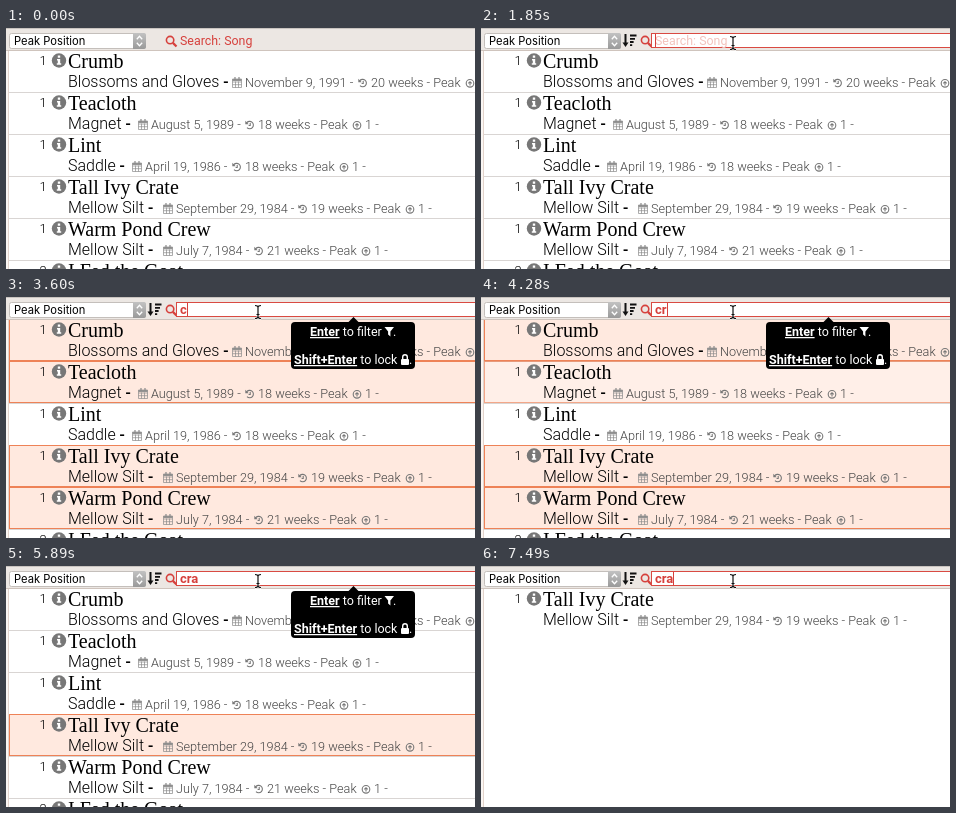
Recreate the animation shown at these times as an HTML page. Size 469x241 px, loop 8 s.

```html
<!DOCTYPE html>
<html lang="en">
<head>
<meta charset="utf-8">
<title>Filter list</title>
<style>
html, body { margin: 0; width: 100%; height: 100%; overflow: hidden; background: #fff; }
svg { display: block; width: 469px; height: 241px; font-family: Roboto, sans-serif; }
svg text { white-space: pre; }

.title { font: 20px "Liberation Serif", serif; }
.album { font-size: 16px; font-weight: 300; }
.dash { font-weight: 500; }
.meta { font-size: 12.7px; font-weight: 300; fill: #444; }
.num { font-size: 13px; font-weight: 300; }
.line { fill: #d9d5d3; }
.hit { fill: #ffe9df; stroke: #ee8257; opacity: 0; }
.label { font-size: 12.4px; fill: #d6403c; }
.tip { font-size: 12.5px; fill: #fff; }
.key { font-weight: 700; text-decoration: underline; }
.typed { font-size: 13px; font-weight: 700; }

.anim, .hit { animation: 8s linear infinite; }
.step { animation: 8s step-end infinite; }

/* focus at 1500 ms */
#idle { animation-name: idle; }
#focus { animation-name: focus; }
@keyframes idle { 0% { opacity: 1 } 18.75%, 100% { opacity: 0 } }
@keyframes focus { 0% { opacity: 0 } 18.75%, 100% { opacity: 1 } }

#hint { animation-name: hint; }
@keyframes hint { 0% { opacity: 1 } 38.75%, 100% { opacity: 0 } }

#k0 { animation-name: k0; }
#k1 { animation-name: k1; }
#k2 { animation-name: k2; }
@keyframes k0 { 0% { fill: transparent } 38.75%, 100% { fill: #d6403c } }
@keyframes k1 { 0% { fill: transparent } 49.125%, 100% { fill: #d6403c } }
@keyframes k2 { 0% { fill: transparent } 60.875%, 100% { fill: #d6403c } }

#caret { animation-name: caretMove, caretBlink; }
@keyframes caretMove {
  0% { transform: translateX(174px) }
  38.75% { transform: translateX(181px) }
  49.125% { transform: translateX(186px) }
  60.875%, 100% { transform: translateX(192px) }
}
@keyframes caretBlink {
  0% { opacity: 0 } 18.75% { opacity: 1 } 29.875% { opacity: 0 } 35.75% { opacity: 1 }
  73.625% { opacity: 0 } 79.5% { opacity: 1 } 85.5% { opacity: 0 } 88.75%, 100% { opacity: 1 }
}

#tip { animation-name: tip; }
@keyframes tip { 0%, 43.9% { opacity: 0 } 45%, 87.5% { opacity: 1 } 88.75%, 100% { opacity: 0 } }

.hit.c { animation-name: hitC; }
.hit.cr { animation-name: hitCr; }
.hit.cra { animation-name: hitCra; }
@keyframes hitC { 0%, 43.9% { opacity: 0 } 45%, 53.2% { opacity: 1 } 54.25%, 100% { opacity: 0 } }
@keyframes hitCr { 0%, 43.9% { opacity: 0 } 45%, 65% { opacity: 1 } 66.125%, 100% { opacity: 0 } }
@keyframes hitCra { 0%, 43.9% { opacity: 0 } 45%, 87.5% { opacity: 1 } 88.75%, 100% { opacity: 0 } }

.drop { animation-name: drop; }
.rise { animation-name: rise; }
@keyframes drop { 0% { opacity: 1 } 87.75%, 100% { opacity: 0 } }
@keyframes rise { 0% { transform: none } 87.75%, 100% { transform: translateY(-126px) } }

#arrow { animation-name: arrowMove, arrowShow; }
@keyframes arrowMove {
  0%, 3% { transform: translate(300px, -18px); animation-timing-function: ease-out }
  12.4%, 13.1% { transform: translate(283px, 19px); animation-timing-function: ease-in-out }
  18%, 100% { transform: translate(256px, 15px) }
}
@keyframes arrowShow { 0%, 17% { opacity: 1 } 17.01%, 100% { opacity: 0 } }
#beam { animation-name: beamMove, beamShow; }
@keyframes beamMove {
  0%, 17% { transform: translate(259px, 15px) }
  23.125%, 26.8% { transform: translate(252px, 15px) }
  28.4% { transform: translate(255px, 14px) }
  29.875%, 100% { transform: translate(252px, 15px) }
}
@keyframes beamShow { 0%, 17% { opacity: 0 } 17.01%, 100% { opacity: 1 } }

#load { animation-name: load; }
@keyframes load {
  0%, 90.6% { transform: scaleX(0) }
  93% { transform: scaleX(1) }
  93.6%, 100% { transform: scaleX(0) }
}
</style>
</head>
<body>
<svg viewBox="0 0 469 241" xmlns="http://www.w3.org/2000/svg">
  <defs>
    <g id="cal" fill="none" stroke="#8a8a8a" stroke-width=".7">
      <path d="M.5 2h9v8.5h-9zM.5 5h9M.5 7.7h9M3.5 4.5v6M6.5 4.5v6"/>
      <path d="M.5 3h9" stroke-width="1.8"/>
      <path d="M3 0v3M7 0v3" stroke-width="1.2"/>
    </g>
    <g id="hist" fill="none" stroke="#777" stroke-width="1.1">
      <path d="M1.6 4A3.7 3.7 0 1 1 2 8.6M5.2 4v2.5H3.6"/>
      <path d="M.3 1.8v3.4h3.4z" fill="#777" stroke="none"/>
    </g>
    <g id="up" fill="none" stroke="#777" stroke-width="1.1">
      <circle cx="5" cy="6.3" r="3.8"/>
      <path d="M5 8.6V4.6M3.3 6.4L5 4.7 6.7 6.4"/>
    </g>
    <g id="info">
      <circle r="7.2" fill="#777"/>
      <path d="M-1.2-5h2.4v2.2h-2.4zM-2-1.6h3.2v4.4h1v1.5h-4.4v-1.5h1v-2.9h-.8z" fill="#fff"/>
    </g>
    <g id="lens" fill="none" stroke="#d6403c">
      <circle cx="4.6" cy="4.6" r="3.7" stroke-width="1.6"/>
      <path d="M7.4 7.4l3.6 3.6" stroke-width="2.2"/>
    </g>
    <path id="bar" d="M-3-6.5q3 0 3 2v9q0 2-3 2M3-6.5q-3 0-3 2v9q0 2 3 2M-1.5 2.5h3"/>
    <linearGradient id="knob" x2="0" y2="1">
      <stop stop-color="#c2c2c2"/>
      <stop offset="1" stop-color="#9a9a9a"/>
    </linearGradient>
  </defs>

  <rect width="469" height="241" fill="#fff"/>
  <g id="rows"></g>
  <rect width="2" height="241" fill="#faf6f3"/>
  <rect x="2" y="22" width="1" height="219" fill="#e2d3cb"/>

  <rect width="469" height="22" fill="#ece7e3"/>
  <rect width="469" height="1" fill="#c9c4c0"/>
  <rect y="22" width="469" height="1" fill="#cfc4bd"/>
  <rect id="load" class="anim" width="469" height="1" fill="#e9a08c"/>

  <rect x="3.5" y="5.5" width="136" height="15" rx="2" fill="#fff" stroke="#c4bfbb"/>
  <path d="M127 5h11q2 0 2 2v12q0 2-2 2h-11z" fill="url(#knob)"/>
  <path d="M130.8 11.3l2.7-3 2.7 3M130.8 14.7l2.7 3 2.7-3" fill="none" stroke="#fff" stroke-width="1.3"/>
  <text x="8" y="17" font-family="Inter, sans-serif" font-size="11.2">Peak Position</text>

  <g id="idle" class="step">
    <use href="#lens" x="159.5" y="7.5"/>
    <text class="label" x="174" y="17">Search: Song</text>
  </g>
  <g id="focus" class="step">
    <path d="M144.5 6v10" stroke="#111" stroke-width="2"/>
    <path d="M141.5 14.5h6l-3 4.5z" fill="#111"/>
    <path d="M149 7.5h6.5M149 10.8h5M149 14h3.6M149 17.2h2.2" stroke="#111" stroke-width="1.8"/>
    <use href="#lens" x="159.5" y="7.5"/>
    <rect x="170.5" y="5.5" width="310" height="14" fill="#fff" stroke="#d94a42"/>
    <text id="hint" class="label step" x="174" y="17" style="fill:#f3c3bd">Search: Song</text>
    <text class="typed" x="174" y="17"><tspan id="k0" class="step">c</tspan><tspan id="k1" class="step">r</tspan><tspan id="k2" class="step">a</tspan></text>
    <rect id="caret" class="step" y="6" width="1" height="13" fill="#d6403c"/>
  </g>

  <g id="tip" class="anim">
    <path d="M342 25.5l5.5-5.5 5.5 5.5z"/>
    <rect x="285" y="25" width="124" height="47" rx="4"/>
    <text class="tip" x="304" y="39"><tspan class="key">Enter</tspan> to filter</text>
    <path d="M378.5 30h9.5l-3.6 4.6v5l-2.3-2v-3z" fill="#fff"/>
    <text class="tip" x="387" y="39">.</text>
    <text class="tip" x="288" y="67"><tspan class="key">Shift+Enter</tspan> to lock</text>
    <rect x="395" y="62" width="8" height="6" rx="1" fill="#fff"/>
    <path d="M396.7 62v-2a2.3 2.3 0 0 1 4.6 0v2" fill="none" stroke="#fff" stroke-width="1.4"/>
    <text class="tip" x="403" y="67">.</text>
  </g>

  <path id="arrow" class="anim" d="M0 0v14l3.3-3 2.2 5.2 2.2-1-2.2-5h4.4z" stroke="#fff"/>
  <g id="beam" class="anim" fill="none">
    <use href="#bar" stroke="#fff" stroke-width="2.4"/>
    <use href="#bar" stroke="#111" stroke-width="1.2"/>
  </g>
</svg>
<script>
// rank, title, album, date, weeks, calendar x, history x, longest matching query
const songs = [
  [1, "Crumb", "Blossoms and Gloves", "November 9, 1991", 20, 226, 352, "cr"],
  [1, "Teacloth", "Magnet", "August 5, 1989", 18, 132, 239, "c"],
  [1, "Lint", "Saddle", "April 19, 1986", 18, 126, 226, ""],
  [1, "Tall Ivy Crate", "Mellow Silt", "September 29, 1984", 19, 157, 292, "cra"],
  [1, "Warm Pond Crew", "Mellow Silt", "July 7, 1984", 21, 157, 248, "cr"],
  [2, "I Fed the Goat", "", "", 0, 0, 0, ""]
];

const text = (cls, x, y, str) => `<text class="${cls}" x="${x}" y="${y}">${str}</text>`;
const icon = (id, x, y) => `<use href="#${id}" x="${x}" y="${y}"/>`;

function details(album, date, weeks, cal, hist) {
  return text("album", 62, 37, `${album} <tspan class="dash">-</tspan>`) +
    icon("cal", cal, 27) + text("meta", cal + 13, 37, date + " -") +
    icon("hist", hist, 27) + text("meta", hist + 13, 37, weeks + " weeks - Peak") +
    icon("up", hist + 107, 27) + text("meta", hist + 120, 37, "1 -");
}

function row([rank, title, album, date, weeks, cal, hist, match], i) {
  const hit = match ? `<rect class="hit ${match}" x="3.5" y=".5" width="480" height="41"/>` : "";
  const line = `<rect class="line step drop" x="3" width="466" height="1"/>`;
  return `<g transform="translate(0 ${22 + 42 * i})">
    <g class="step ${match === "cra" ? "rise" : "drop"}">
      ${line}${hit}
      ${text("num", 33.5, 15, rank)}${icon("info", 53, 10.5)}
      ${text("title", 62, 18, title)}
      ${album && details(album, date, weeks, cal, hist)}
    </g></g>`;
}

document.getElementById("rows").innerHTML = songs.map(row).join("");
</script>
</body>
</html>
```
